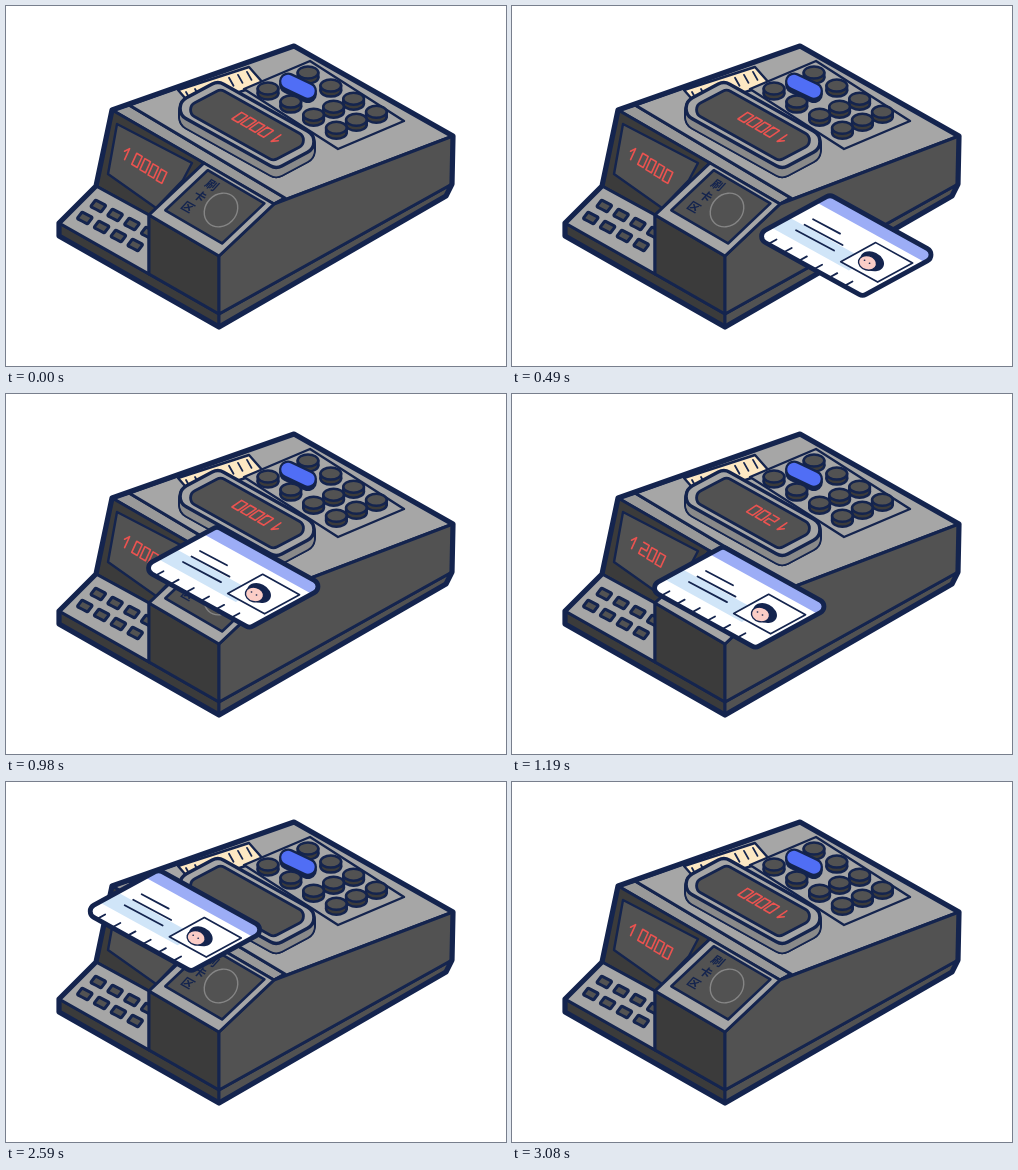
An HTML page with a canvas that plays this animation: 500 by 360 pixels, repeating every 3.15 s.

```html
<!DOCTYPE html>
<html lang="zh">
<head>
<meta charset="utf-8">
<title>Card reader</title>
<style>
html, body { margin: 0; width: 100%; height: 100%; overflow: hidden; background: #fff; }
canvas { display: block; width: 500px; height: 360px; }
</style>
</head>
<body>
<canvas id="stage"></canvas>
<script>
const LOOP = 3150, STEP = 70;
const NAVY = '#14244e', LIGHT = '#a6a6a6', BEVEL = '#999', MID = '#525252', DARK = '#3b3b3b', RED = '#ea5350';

const canvas = document.getElementById('stage');
const ctx = canvas.getContext('2d');
const dpr = window.devicePixelRatio || 1;
canvas.width = 500 * dpr;
canvas.height = 360 * dpr;
ctx.scale(dpr, dpr);
ctx.lineJoin = ctx.lineCap = 'round';

// --- drawing helpers ---

function paint(fill, width, color = NAVY) {
  if (fill) { ctx.fillStyle = fill; ctx.fill(); }
  if (width) { ctx.lineWidth = width; ctx.strokeStyle = color; ctx.stroke(); }
}

function trace(pts, closed) {
  ctx.beginPath();
  pts.forEach(p => ctx.lineTo(...p));
  if (closed) ctx.closePath();
}

function poly(pts, fill, width = 3) {
  trace(pts, true);
  paint(fill, width);
}

function line(pts, width = 3, color = NAVY) {
  trace(pts, false);
  paint(null, width, color);
}

function roundTrace(pts, r) {
  const a = pts[pts.length - 1], b = pts[0];
  ctx.beginPath();
  ctx.moveTo((a[0] + b[0]) / 2, (a[1] + b[1]) / 2);
  pts.forEach((p, i) => ctx.arcTo(...p, ...pts[(i + 1) % pts.length], r));
  ctx.closePath();
}

function roundPoly(pts, r, fill, width) {
  roundTrace(pts, r);
  paint(fill, width);
}

function ellipse(x, y, rx, ry, rot, fill, width, color) {
  ctx.beginPath();
  ctx.ellipse(x, y, rx, ry, rot, 0, Math.PI * 2);
  paint(fill, width, color);
}

// A skewed plane: origin plus p along a and q along b.
const plane = ([x, y], a, b) => (p, q) => [x + a[0] * p + b[0] * q, y + a[1] * p + b[1] * q];
const quad = (at, p0 = 0, q0 = 0, p1 = 1, q1 = 1) => [at(p0, q0), at(p0, q1), at(p1, q1), at(p1, q0)];
const shift = (pts, dx, dy) => pts.map(([x, y]) => [x + dx, y + dy]);

// --- corners of the machine ---

const back = [288, 40], right = [447, 130], rightLow = [446, 178], rightBase = [440, 190];
const nose = [213, 250], noseLow = [213, 308], noseBase = [213, 321];
const left = [53, 217], leftBase = [53, 230], ledge = [90, 180], brow = [106, 104];
const blockTop = [143, 209], blockLow = [143, 268], padTop = [198, 157], padRight = [268, 198];
const bevelLeft = [123, 99], bevelRight = [279, 192];

const padPlane = plane(blockTop, [70, 41], [55, -52]);
const boardPlane = plane([238, 83], [94, 60], [66, -28]);
const displayPlane = plane([161, 102], [109, 61], [51, -27]);
const cardPlane = plane([135, 174], [108.5, 60], [76, -41.5]);

// --- digits ---

const GLYPHS = {
  0: [[0, 0], [1, 0], [1, 1], [0, 1], [0, 0]],
  1: [[-0.35, 0.6], [0.2, 1], [0.2, 0]],
  2: [[0, 1], [1, 1], [1, 0.5], [0, 0.5], [0, 0], [1, 0]]
};

function digits(text, [x, y], u, v, gap) {
  [...text].forEach((c, i) => {
    const at = plane([x + gap[0] * i, y + gap[1] * i], u, v);
    line(GLYPHS[c].map(p => at(...p)), 1.6, RED);
  });
}

function readout(text) {
  const dx = text.length < 5 ? 1 : 0;
  digits(text, [117.5 + dx, 153 + dx], [5.5, 3.2], [5, -11], [8.2, 5.3]);
  digits(text, [276, 129.5], [-6, -3.5], [-9.6, 6.6], [-8.6, -4.9]);
}

// --- machine parts ---

function roundKey(x, y) {
  ellipse(x, y + 5, 10.3, 6, 0, DARK, 2.5);
  ctx.fillStyle = DARK;
  ctx.fillRect(x - 10.3, y, 20.6, 5);
  for (const side of [-10.3, 10.3]) line([[x + side, y], [x + side, y + 5]], 2.5);
  ellipse(x, y, 10.3, 6, 0, MID, 2.5);
}

function blueKey() {
  const pill = (dy, width, color) => line([[282, 75.5 + dy], [302, 85 + dy]], width, color);
  pill(3, 18, NAVY);
  pill(0, 18, NAVY);
  pill(0, 13.5, '#506ef5');
}

function keyboard() {
  poly(quad(boardPlane), LIGHT, 2.4);
  for (let i = 0; i < 4; i++) {
    for (let j = 2; j >= 0; j--) {
      const wide = j === 1 && i < 2;
      if (!wide) roundKey(262 + i * 22.8 + j * 20, 82.5 + i * 13.1 - j * 8);
    }
    if (i === 0) blueKey();
  }
}

function paper() {
  poly(quad(plane([172, 84], [15, 17], [71, -23])), '#fde8c3', 2.4);
  for (const x of [180, 189, 223, 232, 241]) {
    const y = 86 - (x - 180) * 0.33;
    line([[x, y], [x + 4.5, y + 8]], 1.8);
  }
}

function topDisplay() {
  const face = quad(displayPlane);
  for (let d = 9; d > 0; d--) roundPoly(shift(face, 0, d), 12, null, 3.4);
  roundPoly(shift(face, 0, 9), 12, NAVY, 3.4);
  for (let d = 9; d > 0; d--) roundPoly(shift(face, 0, d), 12, '#8a8a8a', 0);
  roundPoly(face, 12, LIGHT, 3.4);
  roundPoly(quad(displayPlane, 0.08, 0.12, 0.92, 0.88), 8, MID, 2.8);
}

function screen() {
  poly([brow, padTop, blockTop, ledge], DARK);
  poly([[111, 118], [186, 157], [177, 174], [150, 202], [102, 168]], MID, 2.4);
}

function smallKeys() {
  ctx.save();
  trace([left, ledge, blockTop, blockLow], true);
  ctx.clip();
  for (let row = 0; row < 2; row++) {
    for (let i = 0; i < 4; i++) {
      const x = 92.3 - row * 13.5 + i * 16.8, y = 200 + row * 12 + i * 9;
      roundPoly(quad(plane([x, y], [10.5, 5.4], [5, -6.5]), -0.5, -0.5, 0.5, 0.5), 1, MID, 3);
    }
  }
  ctx.restore();
}

function pad() {
  poly(quad(padPlane), LIGHT);
  poly(quad(padPlane, 0.1, 0.17, 0.91, 0.94), MID, 2.6);
  ctx.fillStyle = NAVY;
  ctx.font = '700 12.5px "Noto Sans CJK SC", "Noto Sans CJK", sans-serif';
  ctx.textAlign = 'center';
  ctx.textBaseline = 'middle';
  [...'刷卡区'].forEach((c, i) => {
    ctx.save();
    ctx.transform(0.82, 0.46, -0.66, 0.72, 206 - i * 12, 179 + i * 11);
    ctx.fillText(c, 0, 0);
    ctx.restore();
  });
  ellipse(215, 204, 18, 15.5, -0.8, null, 1.4, '#858585');
}

function machine() {
  const outline = [back, right, rightLow, rightBase, noseBase, leftBase, left, ledge, brow];
  poly(outline, MID, 0);
  poly([left, blockLow, noseLow, noseBase, leftBase], DARK);
  poly([noseLow, rightLow, rightBase, noseBase], MID);
  poly([brow, bevelLeft, bevelRight, padRight], BEVEL);
  poly([back, right, padRight, bevelRight, bevelLeft], LIGHT);
  paper();
  keyboard();
  topDisplay();
  screen();
  poly([left, ledge, blockTop, blockLow], LIGHT);
  smallKeys();
  poly([blockTop, nose, noseLow, blockLow], DARK);
  poly([nose, padRight, right, rightLow, noseLow], MID);
  pad();
  poly(outline, null, 5.2);
}

// --- card ---

function portrait() {
  ellipse(253, 199, 12.5, 9.3, 0.45, NAVY);
  ellipse(248.5, 200.5, 9.2, 7.2, 0.25, '#fbcdc6', 1.4);
  for (const k of [0, 1]) ellipse(245.5 + k * 5, 198 + k * 3, 0.9, 0.8, 0, NAVY);
}

function card([dx, dy]) {
  const edge = quad(cardPlane);
  ctx.save();
  ctx.translate(dx, dy);
  roundPoly(edge, 7, '#fff', 0);
  ctx.save();
  ctx.clip();
  poly(quad(cardPlane, 0, 0.22, 0.72, 0.46), '#d0e5f8', 0);
  poly(quad(cardPlane, 0, 0.82, 1, 1), '#9cadf6', 0);
  for (let p = 0.13; p < 0.9; p += 0.14) line([cardPlane(p, 0), cardPlane(p, 0.11)], 1.8);
  ctx.restore();
  for (let k = 0; k < 3; k++) {
    const x = 194 - 8.5 * k, y = 157 + 5.5 * k, len = k ? 38 : 27;
    line([[x, y], [x + len, y + len * 0.53]], 1.8);
  }
  poly(quad(cardPlane, 0.61, 0.27, 0.95, 0.73), '#fff', 1.7);
  portrait();
  roundPoly(edge, 7, null, 4.8);
  ctx.restore();
}

// --- timing ---

function ease(t, from, to) {
  const k = Math.min(1, Math.max(0, (t - from) / (to - from)));
  return k * k * (3 - 2 * k);
}

function cardOffset(t) {
  if (t < 70 || t >= 3080) return null;
  if (t < 2240) {
    const away = 1 - ease(t, 70, 980);
    return [192 * away, 101 * away + 20 * ease(t, 980, 1190)];
  }
  const out = ease(t, 2240, 3010);
  return [-135 * out, -11 - 78 * out];
}

function readoutText(t) {
  if (t < 1050 || t >= 3080) return '10000';
  return t >= 1190 && t < 2240 ? '1200' : '';
}

function draw(t) {
  ctx.fillStyle = '#fff';
  ctx.fillRect(0, 0, 500, 360);
  machine();
  readout(readoutText(t));
  const pos = cardOffset(t);
  if (pos) card(pos);
}

const start = performance.now();
function tick() {
  const t = (performance.now() - start) % LOOP;
  draw(Math.floor(t / STEP) * STEP);
  requestAnimationFrame(tick);
}
tick();
</script>
</body>
</html>
```
